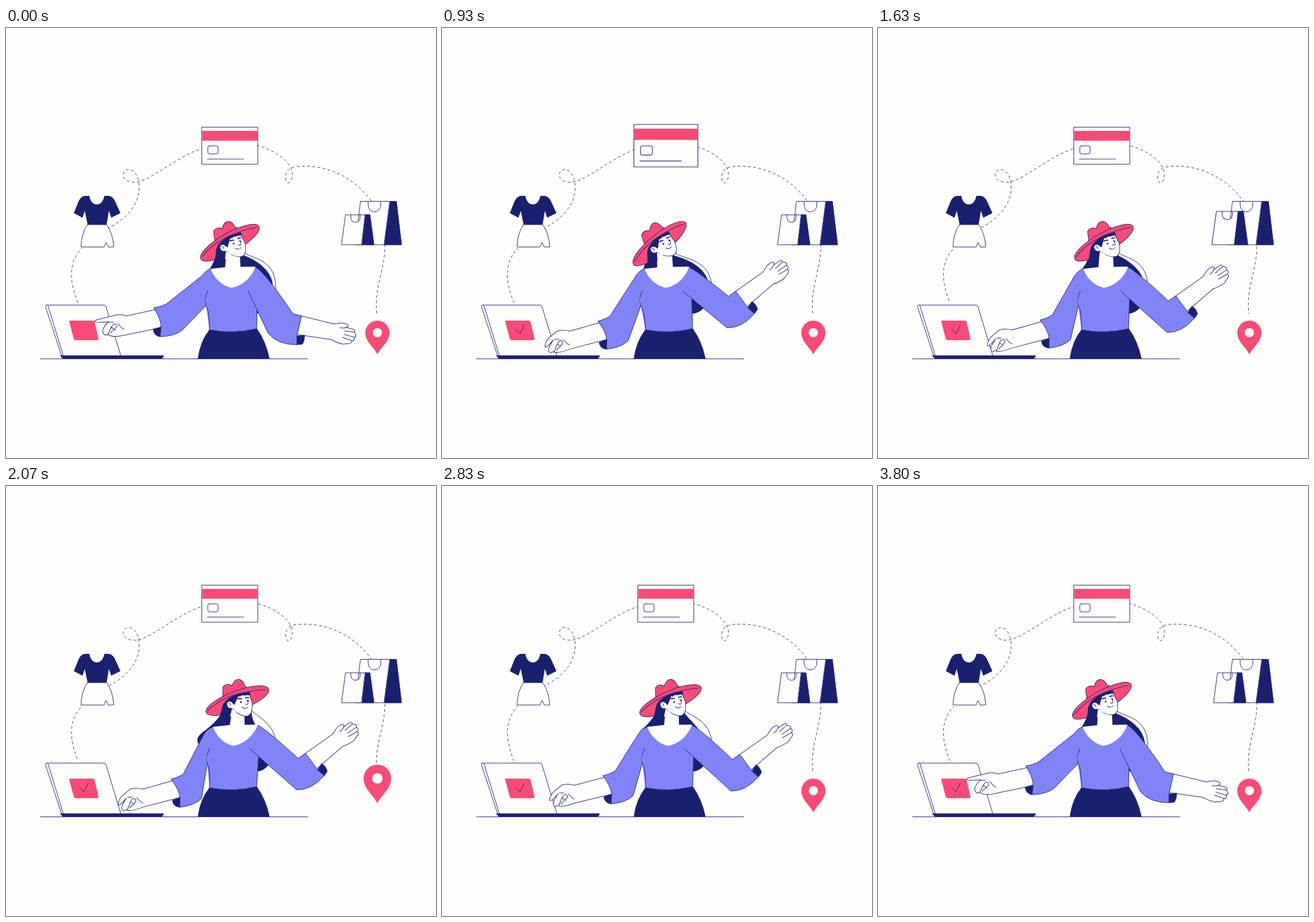
These frames come from a looping animation (748 by 748 pixels, 3.83 s). An HTML page:

```html
<!DOCTYPE html>
<html lang="en">
<head>
<meta charset="utf-8">
<title>Online shopping</title>
<style>
  html, body { margin: 0; height: 100%; overflow: hidden; background: #fdfdfc; }
  svg { display: block; width: 748px; height: 748px; stroke: #26267e; stroke-width: 1; stroke-linejoin: round; stroke-linecap: round; }
  .line { fill: none; }
  .white { fill: #fdfdfc; }
  .navy { fill: #1a2070; }
  .pink { fill: #fa4a78; }
  .purple { fill: #8084f8; }
  .bare { stroke: none; }
  .dash { fill: none; stroke-width: .9; stroke-dasharray: 5 4; stroke-linecap: butt; }
</style>
</head>
<body>
<svg viewBox="0 0 748 748">
  <g id="trail" class="dash">
    <path d="M125 478C110 440 108 408 132 383"/>
    <path d="M176 349C215 330 236 300 231 268C226 240 203 242 204 257C206 268 222 270 232 267C262 258 300 222 343 209"/>
    <path d="M436 204C465 212 492 228 498 250C500 270 488 274 487 264C485 252 490 243 505 241C555 236 605 258 636 302"/>
    <path d="M659 376C660 420 640 450 645 497"/>
  </g>

  <path class="line" d="M60 575.5H525"/>
  <path class="white" d="M71 482H171Q173 482 174 485L200 571H97L69 486Q68 482 71 482ZM73 483L100 571"/>
  <path class="navy" d="M95 570H274Q273 575 269 575H101Q97 575 95 570Z"/>
  <g id="button">
    <path class="pink bare" d="M111 509H151Q153 509 154 511L161 541Q161 543 159 543H121Q119 543 118 541L110 511Q110 509 111 509Z"/>
    <path id="check" class="line" pathLength="1" stroke-dasharray="1 2" d="M128 524L136 532L143 517"/>
  </g>

  <g id="clothes">
    <path class="white" d="M142 342H175Q186 357 187.500 381H178L174 373L170.500 381H130.500Q131 357 142 342Z"/>
    <path class="navy bare" d="M137 292H145C148 312 168 312 171 292H179Q186 293 190 302L199 322L183 330L179 318L175 342H142L137 318L133 330L118 322L126 302Q130 293 137 292Z"/>
  </g>

  <g id="card">
    <rect class="white" x="341" y="172.500" width="97" height="64.500"/>
    <rect class="pink bare" x="341.500" y="179" width="96" height="17"/>
    <rect class="line" x="351" y="205" width="18" height="14" rx="3"/>
    <path class="line" d="M350 228H413"/>
  </g>

  <g id="bigBag">
    <path class="white" d="M617 301.500H679L688 377H608ZM630 302V308A11 12 0 0 0 652 308V302"/>
    <path class="navy" d="M668 301.500H679L688 377H658Z"/>
  </g>
  <g id="smallBag">
    <path class="white" d="M591 325H633L640 377H584ZM600 325V330A8 8 0 0 0 616 330V325"/>
    <path class="navy" d="M625 325H633L640 377H619Z"/>
  </g>

  <g id="pin" class="bare">
    <path class="pink" d="M646 568C640 555 625 546 625 530A21 21 0 0 1 667 530C667 546 652 555 646 568Z"/>
    <circle class="white" cx="646" cy="530" r="8"/>
  </g>

  <path id="hair" class="navy bare"/>
  <path id="ribbon" class="white"/>
  <path id="neck" class="white bare"/>
  <path id="torso" class="purple bare"/>
  <path id="sides" class="line"/>
  <path id="skin" class="white bare"/>

  <g id="rightArm">
    <path class="white" d="M-4 -1L57 14Q68 11 76 13Q82 15 81 18L78 20L90 23Q95 25 92 28L94 32Q96 36 92 37Q94 42 88 43Q87 49 80 48L72 49Q60 46 52 41L-10 32"/>
    <path class="line" d="M78 20Q72 22 67 20M92 28L75 26M92 37L74 32M88 43L71 37"/>
    <path class="navy" d="M-8 35L5 33Q6 43 1 49L-8 50Z"/>
  </g>
  <path id="rightSleeve" class="purple"/>

  <g id="leftArm">
    <path id="leftHand" class="white"/>
    <path class="line" d="M-80 46L-73 32Q-66 23 -64 33L-76 44M-78 25L-70 25M-74 33L-67 39M-62 27Q-57 35 -52 37"/>
    <path class="navy" d="M13 33L-1 37Q0 48 11 50Z"/>
  </g>
  <path id="leftSleeve" class="purple"/>
  <path class="navy" d="M354 525Q395 533 436 523Q452 545 458 575H334Q338 545 354 525Z"/>

  <g id="head">
    <path class="pink" d="M364 376L361 354Q366 345 376 349Q380 334 390 337Q396 340 398 346Q405 347 405 356Z"/>
    <ellipse class="pink" cx="389.500" cy="373.500" rx="58" ry="17" transform="rotate(-29.400 389.500 373.500)"/>
    <path class="line" d="M341 398Q360 374 392 360Q420 349 436 347"/>
    <path class="navy bare" d="M365 392C364 376 382 360 409 356L413 370L390 394L378 404L363 404Z"/>
    <path class="white" d="M383 396L382 388Q374 390 372 382Q372 375 380 377L385 381L390 364L409 360Q412 367 416 374L417 388Q415 399 405 398Q393 397 383 388"/>
    <path class="white bare" d="M382.500 388L392 394L390 402L381 402Z"/>
    <path class="navy bare" d="M385 381Q382 370 388 362L408 355L410 361L403 359L401 363L397 361L393 366L389 365Z"/>
    <path class="line" stroke-width="2" d="M390 370L396 369M403 366L408 365"/>
    <path class="line" d="M405 369Q411 375 407 378L404 377M399 383Q404 387 409 382M375 380Q378 380 379 384"/>
    <circle class="navy bare" cx="396" cy="375" r="1.500"/>
    <circle class="navy bare" cx="408" cy="371" r="1.300"/>
  </g>
</svg>
<script>
const LOOP = 3830;
const $ = id => document.getElementById(id);
const set = (id, name, value) => $(id).setAttribute(name, value);

// time, head x, y, tilt, torso lean, left cuff x, y, turn, finger curl, right cuff x, y, turn
const poses = [
  [0, 0, 0, 0, 0, 257, 487, 0, 0, 514, 501, 0],
  [370, -9.5, 2, -7, -4, 270, 506, -4, .8, 509, 490, -8],
  [930, -11, 1.5, -9.5, -4, 271, 510, -5, 1, 511, 458, -49],
  [1630, 3.5, 0, 0, 1, 282, 508, -5, 1, 518, 466, -49],
  [2070, 13, 0, 8.8, 4, 287, 510, -5, 1, 521, 465, -49],
  [2830, 8, 0, 5.7, 1, 280, 504, -4, 1, 518, 467, -49],
  [LOOP, 0, 0, 0, 0, 257, 487, 0, 0, 514, 501, 0]
];

// Smooth curve through the poses, at rest at both ends of the loop
function poseAt(t) {
  let i = 0;
  while (i < poses.length - 2 && t >= poses[i + 1][0]) i++;
  const a = poses[i], b = poses[i + 1], span = b[0] - a[0], u = (t - a[0]) / span;
  const slope = (n, k) => {
    const p = poses[n - 1], q = poses[n + 1];
    return p && q ? (q[k] - p[k]) / (q[0] - p[0]) * span : 0;
  };
  const s = u * u * (3 - 2 * u);
  return a.map((v, k) => v + (b[k] - v) * s
    + u * (1 - u) * (1 - u) * slope(i, k) - u * u * (1 - u) * slope(i + 1, k)).slice(1);
}

const clamp = x => Math.min(1, Math.max(0, x));
const bump = (t, peak, half) => Math.cos(clamp(Math.abs(t - peak) / half) * Math.PI / 2) ** 2;

function grow(id, amount, x, y, lift = 0) {
  set(id, 'transform', `translate(${x} ${y - lift}) scale(${1 + amount}) translate(${-x} ${-y})`);
}

// Returns a function mapping points of a turned limb to the stage
function limb(id, x, y, turn) {
  set(id, 'transform', `translate(${x} ${y}) rotate(${turn})`);
  const c = Math.cos(turn * Math.PI / 180), s = Math.sin(turn * Math.PI / 180);
  return (px, py) => `${x + px * c - py * s} ${y + px * s + py * c} `;
}

const pointing = 'M2 3L-48 14Q-56 11 -64 12L-97 20Q-105 22 -102 24Q-100 26 -78 24Q-88 32 -89 41Q-86 50 -80 46Q-72 52 -54 48L13 34';
const curled = 'M2 3L-50 13Q-62 9 -72 11L-88 22Q-97 33 -95 37Q-92 38 -80 26Q-90 38 -90 44Q-88 50 -82 46Q-76 51 -52 44L13 33';
const number = /-?\d+/g;
const curledNumbers = curled.match(number);
function mixHand(k) {
  let i = 0;
  return pointing.replace(number, n => +n + (curledNumbers[i++] - n) * k);
}

function drawBody([hx, hy, tilt, lean, lx, ly, lTurn, curl, rx, ry, rTurn]) {
  const at = (x, y) => `${x + lean * (555 - y) / 135} ${y} `;
  const sway = clamp((hx - 3) / 10);
  const inner = `${466 - 20 * sway} ${425 + 10 * sway} ${440 - 12 * sway} ${406 + 8 * sway} ${414 + hx} 396`;

  set('head', 'transform', `translate(${hx} ${hy}) rotate(${tilt} 389.5 373.5)`);
  set('hair', 'd', `M${367 + hx} 384Q${364 + hx * .8} 405 ${354 + lean - 18 * sway} ${420 + 10 * sway}Q${354 - 24 * sway} ${424 + 14 * sway} ${354 - 20 * sway} ${424 + 24 * sway}L360 460L436 497Q452 495 459 481L464 455C${inner}L${385 + hx} 390Z`);
  set('ribbon', 'd', `M464 455C${inner}L${414 + hx} 390C${426 + hx} ${402 + 2 * sway} 472 ${400 + 14 * sway} 469 456`);
  set('neck', 'd', `M${383 + hx * .8} 388L${381 + hx * .6} 420H${408 + hx * .55}L${407 + hx * .6} 396Z`);
  set('skin', 'd', `M${at(356, 419)}L${at(382, 416)}L${at(434, 415)}C${at(425, 440)}${at(405, 450)}${at(392, 452)}C${at(375, 448)}${at(362, 435)}${at(356, 419)}`);
  set('torso', 'd', `M${at(356, 419)}L${at(434, 416)}L${at(445, 440)}L${at(437, 470)}L436 523Q395 533 354 525L${at(348, 483)}L${at(349, 440)}Z`);
  set('sides', 'd', `M${at(437, 470)}L436 523M${at(348, 483)}Q${at(354, 490)}354 525`);

  const r = limb('rightArm', rx, ry, rTurn);
  set('rightSleeve', 'd', `M${at(434, 416)}Q${at(451, 425)}${r(-15, -4)}L${r(0, 0)}Q${r(-3, 15)}${r(-8, 35)}L${r(-8, 50)}Q${r(-42, 50)}${r(-58, 30)}L${at(421, 457)}`);

  const l = limb('leftArm', lx, ly, lTurn);
  set('leftHand', 'd', mixHand(curl));
  set('leftSleeve', 'd', `M${at(356, 419)}Q${at(348, 421)}${at(341, 431)}L${l(22, -7)}Q${l(13, -2)}${l(0, 0)}Q${l(12, 18)}${l(13, 33)}L${l(11, 50)}Q${l(38, 49)}${l(50, 38)}L${at(348, 483)}Q${at(345, 470)}${at(351, 457)}`);
}

function draw(now) {
  const t = now % LOOP;
  drawBody(poseAt(t));
  set('trail', 'stroke-dashoffset', -t / LOOP * 72);

  const tap = .14 * bump(t, 370, 330);
  grow('button', tap, 136, 526);
  grow('clothes', tap, 158.5, 337);
  grow('card', .15 * bump(t, 960, 340), 389.5, 205);
  grow('bigBag', .13 * bump(t, 1330, 300), 648, 377);
  grow('smallBag', .13 * bump(t, 1560, 320), 612, 377);
  const hop = bump(t, 2070, 340);
  grow('pin', .14 * hop, 646, 568, 16 * hop);

  const drawn = clamp((t - 80) / 250);
  set('check', 'stroke-dashoffset', 1 - drawn);
  set('check', 'opacity', drawn ? 1 : 0);
  requestAnimationFrame(draw);
}
requestAnimationFrame(draw);
</script>
</body>
</html>
```
